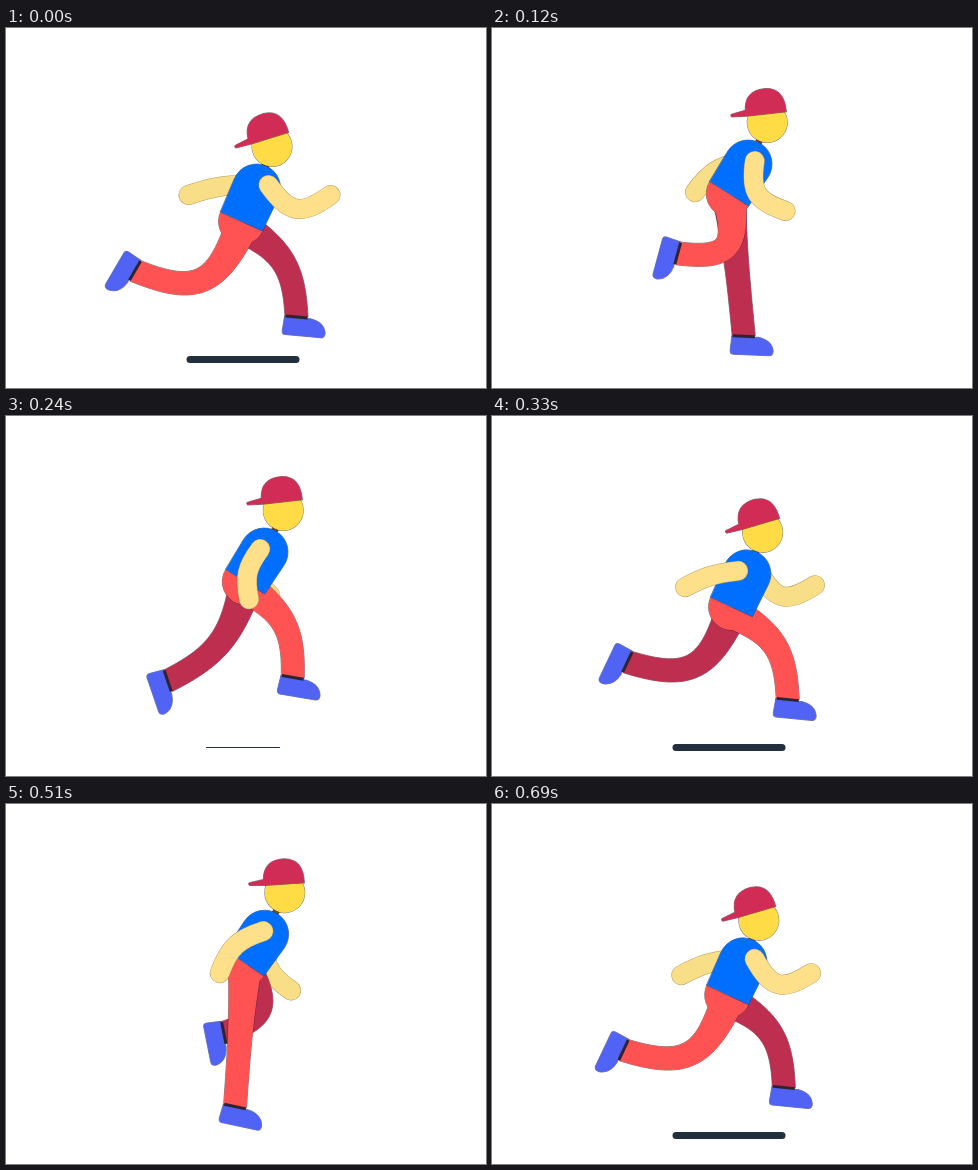
An HTML page with a canvas for the animation above (0.72 s loop, 480 by 360 pixels).

```html
<!DOCTYPE html>
<html lang="en">
<head>
<meta charset="utf-8">
<title>Running figure</title>
<style>
html, body { margin: 0; overflow: hidden; background: #fff; }
canvas { display: block; }
</style>
</head>
<body>
<canvas id="stage" width="480" height="360"></canvas>
<script>
const ctx = document.getElementById('stage').getContext('2d');
const LOOP = 720, STEP = 30, TURN = 2 * Math.PI;
const INK = '#2a2530', EDGE = 'rgba(42, 37, 48, .6)';
const RED = '#ff5252', CRIMSON = '#bd2e4f', SKIN = '#ffe08a', SKIN_FAR = '#f9de88';

const FOOT = new Path2D('M-12 0H14Q28 2 30 13Q30 18 26 18H-10Q-13 18-13 14Z');
const CAP = new Path2D('M-20-8L-35-8.5Q-37-11-34-11.5L-21-14Q-20-34 1-34Q20-33 20-9Z');
const FACE = new Path2D('M20 0A20 20 0 1 1-20 0A20 20 0 1 1 20 0Z');

// Periodic motion: a mean, then a cosine and sine amount for each harmonic.
function wave(phase, mean, ...amounts) {
  return amounts.reduce((sum, amount, i) => {
    const angle = (1 + (i >> 1)) * phase;
    return sum + amount * (i % 2 ? Math.sin(angle) : Math.cos(angle));
  }, mean);
}

// Cubic from a to b whose middle is pushed sideways by bend.
function bentCurve([ax, ay], [bx, by], bend) {
  const push = bend / 0.6 / Math.hypot(bx - ax, by - ay);
  const cx = (ax + bx) / 2 - (by - ay) * push;
  const cy = (ay + by) / 2 + (bx - ax) * push;
  const toward = (x, y) => [x + (cx - x) * 0.8, y + (cy - y) * 0.8];
  return [[ax, ay], toward(ax, ay), toward(bx, by), [bx, by]];
}

function outline(path) {
  ctx.lineWidth = 1;
  ctx.strokeStyle = EDGE;
  ctx.stroke(path);
}

function paint(path, fill) {
  outline(path);
  ctx.fillStyle = fill;
  ctx.fill(path);
}

function line(path, width, color) {
  ctx.lineCap = 'round';
  ctx.lineWidth = width;
  ctx.strokeStyle = color;
  ctx.stroke(path);
}

function segment(x0, y0, x1, y1) {
  const path = new Path2D();
  path.moveTo(x0, y0);
  path.lineTo(x1, y1);
  return path;
}

function local(x, y, angle, draw) {
  ctx.save();
  ctx.translate(x, y);
  ctx.rotate(angle);
  draw();
  ctx.restore();
}

// A ribbon, wider at the thigh; the knee bends more as the foot lifts.
function drawLeg(phase, hipX, hipY, color) {
  const reach = wave(phase, -20, -86, 17, -6, -2, 5, -5);
  const drop = wave(phase, 90.5, -29, -25, -18, 2, 5.5, 2);
  const ankle = [hipX + reach, hipY + drop];
  const [a, c1, c2, b] = bentCurve([hipX, hipY + 5], ankle, 0.36 * (drop - 144));
  const left = [], right = [];
  for (let u = 0; u <= 1; u += 1 / 32) {
    const v = 1 - u;
    const [x, y] = [0, 1].map(i => v ** 3 * a[i] + 3 * v * v * u * c1[i]
      + 3 * v * u * u * c2[i] + u ** 3 * b[i]);
    const [dx, dy] = [0, 1].map(i => v * v * (c1[i] - a[i])
      + 2 * u * v * (c2[i] - c1[i]) + u * u * (b[i] - c2[i]));
    const r = (11.5 + 5 * v ** 3) / Math.hypot(dx, dy);
    left.push([x - dy * r, y + dx * r]);
    right.unshift([x + dy * r, y - dx * r]);
  }
  const ribbon = new Path2D();
  [...left, ...right].forEach(p => ribbon.lineTo(...p));
  ribbon.closePath();
  paint(ribbon, color);

  const shin = Math.atan2(b[1] - c2[1], b[0] - c2[0]);
  local(...ankle, shin - 1.43, () => {
    paint(FOOT, '#5163f5');
    ctx.fillStyle = INK;
    ctx.fillRect(-11, -2, 22, 3);
  });
}

function drawArm(phase, x, y, color) {
  const shoulder = [x + wave(phase, 1.5, 10.5), y - 3];
  const hand = [
    x + wave(phase, -3, 66, 20, 6, -2, 5, -4),
    y + wave(phase, 30, 2.5, 6.5, -23, -4.5, -2.5)
  ];
  const [a, c1, c2, b] = bentCurve(shoulder, hand, wave(phase, 11, 8));
  const arm = new Path2D();
  arm.moveTo(...a);
  arm.bezierCurveTo(...c1, ...c2, ...b);
  line(arm, 20, '#b09c68');
  line(arm, 19, color);
}

// The near leg sits between the outline and the fill of the hips.
function drawTorso(sx, sy, hx, hy, drawNearLeg) {
  const across = Math.atan2(sy - hy, sx - hx) + TURN / 4;
  const dx = 23 * Math.cos(across), dy = 23 * Math.sin(across);
  const hips = new Path2D(), shirt = new Path2D();
  hips.arc(hx, hy, 23, across, across + TURN / 2);
  outline(hips);
  drawNearLeg();
  ctx.fillStyle = RED;
  ctx.fill(hips);
  shirt.arc(sx, sy, 24, across + TURN / 2, across);
  shirt.lineTo(hx + dx, hy + dy);
  shirt.lineTo(hx - dx, hy - dy);
  shirt.closePath();
  paint(shirt, '#006eff');
}

// Spreads while the body falls, then shrinks quickly.
function drawShadow(time) {
  const beat = time % (LOOP / 2);
  const size = beat < 90 ? 1 - beat / 90
    : Math.sqrt(Math.min(1, Math.max(0, (beat - 180) / 140)));
  if (size < 0.05) return;
  const width = Math.max(1, 7 * size ** 5), half = (113 * size - width) / 2;
  line(segment(237 - half, 331.5, 237 + half, 331.5), width, '#22303e');
}

function draw(time) {
  const phase = time / LOOP * TURN, opposite = phase + TURN / 2;
  const bob = Math.cos(2 * phase);
  const sx = 255.5 - 3 * bob - 2 * Math.cos(phase), sy = 144 + 16 * bob;
  const hx = sx - 17.5 + 2.5 * bob, hy = sy + 31 + 2.5 * bob;
  const headX = sx + 18 - 2.5 * bob, headY = sy - 41.5;

  ctx.fillStyle = '#fff';
  ctx.fillRect(0, 0, 480, 360);
  drawShadow(time);
  drawArm(opposite, sx, sy, SKIN_FAR);
  drawLeg(opposite, hx, hy, CRIMSON);
  line(segment(sx + 6, sy - 12, headX - 4, headY + 10), 7, '#7d4630');
  drawTorso(sx, sy, hx, hy, () => drawLeg(phase, hx, hy, RED));
  local(headX, headY, -0.15 - 0.13 * bob, () => {
    paint(FACE, '#ffdc46');
    paint(CAP, '#d02c55');
  });
  drawArm(phase, sx, sy, SKIN);
}

function tick() {
  draw(Math.floor(performance.now() % LOOP / STEP) * STEP);
  requestAnimationFrame(tick);
}
tick();
</script>
</body>
</html>
```
